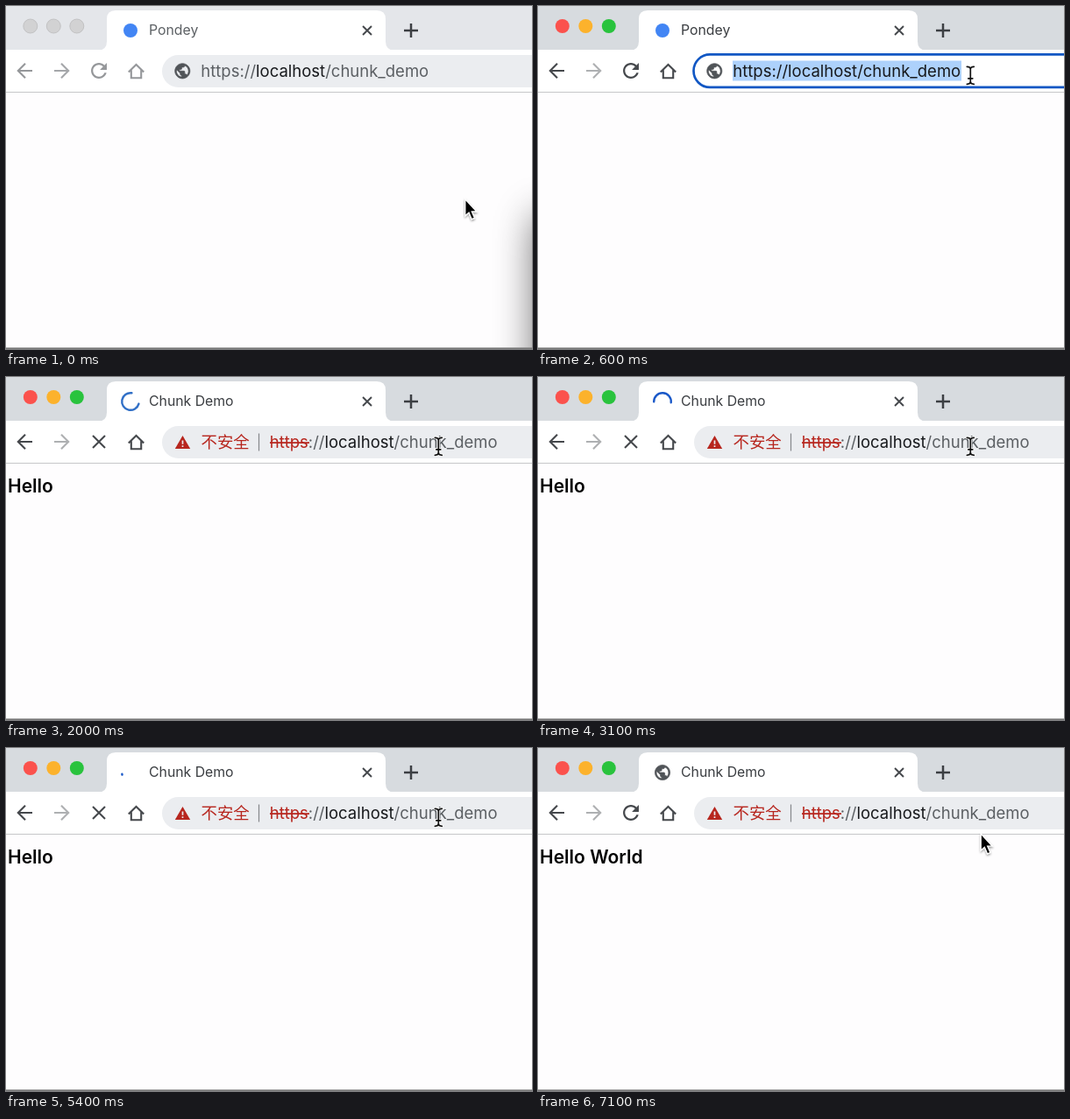
Animation of 600 by 392 pixels, one loop 7600 ms. Source, as an HTML page:

```html
<!DOCTYPE html>
<html lang="en">
<head>
<meta charset="utf-8">
<title>Chunk Demo</title>
<style>
  html, body { margin: 0; width: 100%; height: 100%; overflow: hidden; background: #fefdfe; }
  svg { display: block; width: 600px; height: 392px; font-family: Inter, Roboto, sans-serif;
    --strip: #e4e6ea; --icon: #95979a; --faint: #a5a7aa; --title: #5c6064; --light: #d2d2d3; --rim: #bcbcbd; }
  svg.active { --strip: #d7dbdf; --icon: #45484c; --faint: #aeb0b2; --title: #3a3d41; --light: initial; --rim: none; }
  .line { fill: none; stroke: var(--icon); stroke-width: 2.1; }
  .title { font-size: 15.8px; fill: var(--title); }
  .url { font-size: 18.5px; fill: #5b5f63; }
  .host { fill: #17191c; }
  .danger { fill: #b7261e; }
  .heading { font-size: 21px; font-weight: 600; fill: #000; }
  .lights circle { stroke: var(--rim); stroke-width: .8; }
  .globe { fill: #505458; stroke: #505458; stroke-width: .8; }
</style>
</head>
<body>
<svg id="stage" viewBox="0 0 600 392">
  <defs>
    <filter id="soft" x="-200%" y="-50%" width="500%" height="200%"><feGaussianBlur stdDeviation="23"/></filter>
    <filter id="drop" x="-50%" y="-50%" width="200%" height="200%">
      <feDropShadow dx="0" dy="1.5" stdDeviation="1.3" flood-opacity=".4"/>
    </filter>
    <path id="globe" transform="scale(.86) translate(-12 -12)" d="M12 2C6.48 2 2 6.48 2 12s4.48 10 10 10 10-4.48 10-10S17.52 2 12 2zm-1 17.93c-3.95-.49-7-3.85-7-7.93 0-.62.08-1.21.21-1.79L9 15v1c0 1.1.9 2 2 2v1.93zm6.9-2.54c-.26-.81-1-1.39-1.9-1.39h-1v-3c0-.55-.45-1-1-1H8v-2h2c.55 0 1-.45 1-1V7h2c1.1 0 2-.9 2-2v-.41c2.93 1.19 5 4.06 5 7.41 0 2.08-.8 3.97-2.1 5.39z"/>
  </defs>

  <!-- page -->
  <rect width="600" height="392" fill="#fefdfe"/>
  <rect data-on="0 400" x="604" y="240" width="120" height="320" opacity=".6" filter="url(#soft)"/>
  <rect y="390.4" width="600" height="1.6" fill="#777"/>
  <text class="heading" x="2" y="132" data-on="1600 5500">Hello</text>
  <text class="heading" x="2" y="132" data-on="5500 7600">Hello World</text>

  <!-- tab strip -->
  <rect width="600" height="50" fill="var(--strip)"/>
  <rect y="50" width="600" height="48" fill="#fff"/>
  <rect y="98" width="600" height="1" fill="#c6c7c9"/>
  <path d="M105 50.5q10 0 10-10V15q0-10 10-10H423q10 0 10 10V40.5q0 10 10 10z" fill="#fff"/>
  <g class="lights">
    <circle cx="27.800" cy="23" r="8" style="fill:var(--light,#fb524d)"/>
    <circle cx="54.300" cy="23" r="8" style="fill:var(--light,#fcb22c)"/>
    <circle cx="80.800" cy="23" r="8" style="fill:var(--light,#29c33d)"/>
  </g>
  <circle data-on="0 1300" cx="142" cy="28" r="8" fill="#4285f4"/>
  <path id="spinner" data-on="1400 5600" fill="none" stroke-width="2.4" stroke-linecap="round"/>
  <use class="globe" href="#globe" data-on="5600 7600" x="142" y="28"/>
  <text class="title" x="163" y="33" data-on="0 1600">Pondey</text>
  <text class="title" x="163" y="33" data-on="1600 7600">Chunk Demo</text>
  <path d="M407 23l10 10m0-10l-10 10" fill="none" stroke="#44474b" stroke-width="1.9"/>
  <path d="M454 28h16m-8-8v16" fill="none" stroke="#3c3f43" stroke-width="2.500"/>

  <!-- toolbar -->
  <path class="line" d="M30 74H14m8-8.200L13.800 74l8.200 8.200"/>
  <path class="line" style="stroke:var(--faint)" d="M55 74H71m-8-8.200L71.200 74l-8.200 8.200"/>
  <path data-on="0 1100 6000 7600" transform="translate(106 74) scale(1.12) translate(-12 -12)" fill="var(--icon)" d="M17.65 6.35C16.2 4.9 14.21 4 12 4c-4.42 0-7.99 3.58-7.99 8s3.57 8 7.99 8c3.73 0 6.84-2.55 7.73-6h-2.08c-.82 2.33-3.04 4-5.65 4-3.31 0-6-2.69-6-6s2.69-6 6-6c1.66 0 3.14.69 4.22 1.78L13 11h7V4l-2.35 2.35z"/>
  <path class="line" data-on="1100 6000" d="M99 67l14 14m0-14l-14 14"/>
  <path class="line" d="M139.800 75.500L148.500 67l8.700 8.500M142.800 73v9.200h11.400V73"/>

  <!-- address bar -->
  <rect x="178" y="56" width="460" height="37" rx="18.500" fill="#ebedf0"/>
  <g data-on="500 1300">
    <rect x="177.500" y="55.400" width="460" height="37.500" rx="18.700" fill="#fff" stroke="#1157c4" stroke-width="2.700"/>
    <rect data-on="500 1000" x="222" y="62.500" width="261" height="23" fill="#add1fb"/>
    <text class="url host" x="222.300" y="81">https://localhost/chunk_demo</text>
  </g>
  <text class="url" x="222.300" y="81" data-on="0 500">https://<tspan class="host">localhost</tspan>/chunk_demo</text>
  <use class="globe" href="#globe" data-on="0 1300" x="201.300" y="74.300"/>

  <g data-on="1300 1600">
    <circle cx="201.500" cy="74.500" r="7.900" fill="none" stroke="#55595d" stroke-width="1.800"/>
    <path d="M201.500 69.800v2m0 1.700v5.500" stroke="#55595d" stroke-width="1.900"/>
    <text class="url" x="222.300" y="81"><tspan class="host">localhost</tspan>/chunk_demo</text>
  </g>

  <g data-on="1600 7600">
    <path class="danger" d="M201.500 67l8.700 15h-17.400z"/>
    <path d="M201.500 72.500v4.200m0 1.500v1.800" stroke="#ebedf0" stroke-width="1.700"/>
    <text class="danger" x="222.500" y="81" font-size="18.400" font-family="'Noto Sans CJK SC', 'Noto Sans CJK', sans-serif" lang="zh">不安全</text>
    <path d="M288.500 64.500v20" stroke="#85888b" stroke-width="1.200"/>
    <text class="url" x="300.700" y="81"><tspan class="danger">https</tspan>://<tspan class="host">localhost</tspan>/chunk_demo</text>
    <path d="M301 75.200h45" stroke="#b7261e" stroke-width="1.700"/>
  </g>

  <!-- pointers -->
  <path id="arrow" data-on="0 300 6500 7600" filter="url(#drop)" stroke="#fff" stroke-width="1.300"
    d="M-.5-1.500V17.500l4.200-3.700 3.200 7.600 3.300-1.400-3.200-7.300h5.600z"/>
  <g id="beam" data-on="300 6500" fill="none" stroke-linecap="round">
    <path stroke="#fff" stroke-width="3.600" opacity=".8" d="M-4-10q4 0 4 3v14q0 3-4 3M4-10q-4 0-4 3m0 14q0 3 4 3M-2.500 3.500h5"/>
    <path stroke="#111" stroke-width="1.700" d="M-4-10q4 0 4 3v14q0 3-4 3M4-10q-4 0-4 3m0 14q0 3 4 3M-2.500 3.500h5"/>
  </g>
</svg>
<script>
const LOOP = 7600, STEP = 100;
const ARC_TIME = 666, MAX_ARC = 270, MIN_ARC = 5, TURN_TIME = 1568;
const byId = id => document.getElementById(id);
const stage = byId('stage'), spinner = byId('spinner');

const timed = [...document.querySelectorAll('[data-on]')].map(el => {
  const times = el.dataset.on.split(' ').map(Number);
  return { el, isOn: t => times.filter(x => x <= t).length % 2 === 1 };
});

// Pointer positions: [time, x, y], each held until the next.
const arrowStops = [[0, 524.3, 222.3], [100, 485, 102], [6500, 503, 95], [6600, 505.7, 99.5]];
const beamStops = [[0, 493.3, 79.3], [6400, 495, 82]];

function place(id, stops, t) {
  const [, x, y] = stops.filter(s => s[0] <= t).pop();
  byId(id).setAttribute('transform', `translate(${x} ${y})`);
}

// cubic-bezier(.4, 0, .2, 1)
function ease(x) {
  let lo = 0, hi = 1, u = x;
  for (let i = 0; i < 20; i++) {
    u = (lo + hi) / 2;
    const at = 1.2 * u * (1 - u) ** 2 + 0.6 * u * u * (1 - u) + u ** 3;
    if (at < x) lo = u; else hi = u;
  }
  return 3 * u * u - 2 * u ** 3;
}

function drawSpinner(t) {
  const phase = (t - 4800) / ARC_TIME, arc = Math.floor(phase);
  let start = 166 + 360 * (t - 5400) / TURN_TIME + MAX_ARC * Math.floor(arc / 2);
  let sweep = MAX_ARC * ease(phase - arc);
  if (arc % 2 === 0) sweep -= MAX_ARC;
  if (Math.abs(sweep) < MIN_ARC) {
    const least = arc % 2 === 0 ? -MIN_ARC : MIN_ARC;
    start += sweep - least;
    sweep = least;
  }
  const point = deg => {
    const a = deg * Math.PI / 180;
    return `${142 + 9.8 * Math.cos(a)} ${28 + 9.8 * Math.sin(a)}`;
  };
  const large = Math.abs(sweep) > 180 ? 1 : 0, clockwise = sweep > 0 ? 1 : 0;
  spinner.setAttribute('d', `M${point(start)}A9.8 9.8 0 ${large} ${clockwise} ${point(start + sweep)}`);

  const fade = (1 - Math.min(1, Math.max(0, (t - 1500) / 900))) ** 2;
  const mix = (from, to) => Math.round(to + (from - to) * fade);
  spinner.setAttribute('stroke', `rgb(${mix(140, 25)},${mix(205, 88)},${mix(190, 200)})`);
}

function render() {
  const t = Math.floor(performance.now() % LOOP / STEP) * STEP;
  stage.classList.toggle('active', t >= 400);
  for (const { el, isOn } of timed) el.style.display = isOn(t) ? '' : 'none';
  place('arrow', arrowStops, t);
  place('beam', beamStops, t);
  drawSpinner(t);
  requestAnimationFrame(render);
}
render();
</script>
</body>
</html>
```
